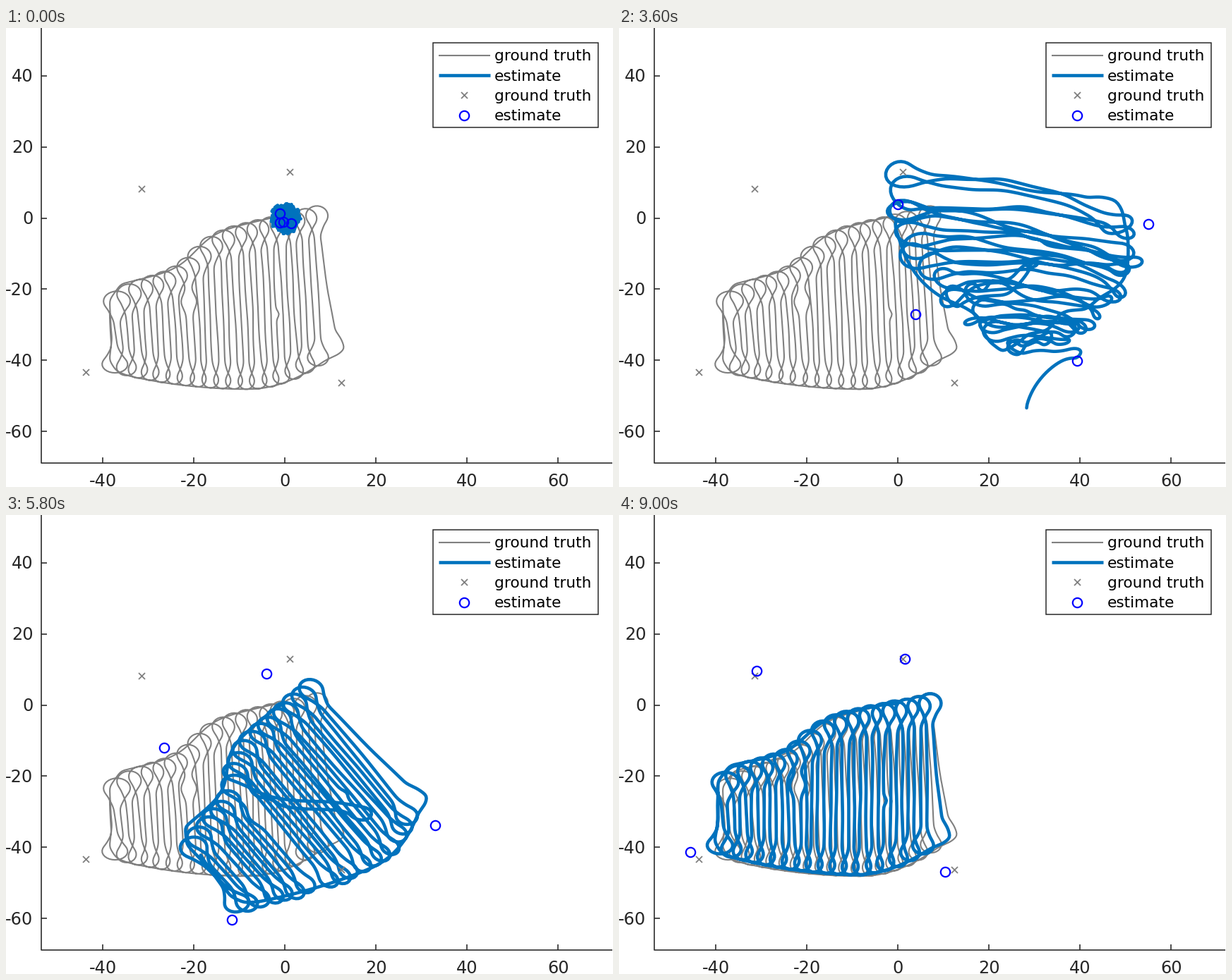
Write a matplotlib script that moves like this. It is 860x651 px and loops after 9400 ms.

```python
import numpy as np
import matplotlib.pyplot as plt
from matplotlib.animation import FuncAnimation
from matplotlib.patches import Rectangle

W, H, DPI = 860, 651, 100
PT = 72 / DPI
X0, Y0, SX, SY = 395.3, 269.5, 6.453, 5.047  # pixel of the zero point, pixels per unit
GRAY, BLUE, MARK, INK = "#808080", "#0072BD", "#0000FF", "#262626"
N, TURNS = 2600, 18
rng = np.random.default_rng(7)


# Points in the plane are complex numbers in axis units.
def smooth(z, sigma):
    r = int(4 * sigma) + 1
    k = np.exp(-0.5 * (np.arange(-r, r + 1) / sigma) ** 2)
    return np.convolve(np.pad(z, r, mode="edge"), k / k.sum(), "valid")


def noise(sigma, sx=1, sy=1):
    n = smooth(rng.standard_normal(N) + 1j * rng.standard_normal(N), sigma)
    n -= n.mean()
    return sx * n.real / n.real.std() + 1j * sy * n.imag / n.imag.std()


def resample(z, n):
    s = np.r_[0, np.cumsum(abs(np.diff(z)))]
    return np.interp(np.linspace(0, s[-1], n), s, z)


# --- mowing path -----------------------------------------------------------
def top(x):
    return 0.3 * x - 2.9 + 4.3 * np.tanh((x + 19.5) / 4.5)


def bottom(x):
    return -48.3 + np.where(x > -8, 0.0287, 0.0054) * (x + 8) ** 2


def bulb(cx, tip, rx, ry, side, neck=0.7):
    """Light-bulb turn from the right-hand line to the left-hand line."""
    cy = tip - side * ry
    a = np.radians(np.linspace(138, -138, 40))
    arc = cx + rx * np.sin(a) + 1j * (cy + side * ry * np.cos(a))
    end = 1j * (cy - side * 1.9 * ry)
    return np.r_[cx + neck + end, arc, cx - neck + end]


def mowing_path():
    out, back = np.linspace(-1, -36, 60), np.linspace(-34.5, 8.8, 70)
    parts = [0, out + 1j * (top(out) - 0.5),
             [-38.5 - 23j, -38.3 - 30j, -38 - 34j, -38.5 - 40j, -37 - 43j],
             back + 1j * (bottom(back) + 0.2),
             [11.7 - 38.3j, 13 - 36.7j, 12.2 - 34j, 10.8 - 31.5j]]
    for k in range(TURNS):
        u = k / (TURNS - 1)
        last, first = np.exp((k + 1 - TURNS) / 1.2), np.exp(-k / 1.2)
        tx, bx = 7.1 - 44 * u, 7.2 - 44.7 * u
        parts.append(bulb(tx, top(tx) - 2.2 * last, 2.6 + 0.4 * last, 2.9, 1))
        parts.append(bulb(bx, bottom(bx), 1.95 + last + 0.5 * first, 2.5, -1))
    parts.append(-38.5 - 26j)
    z = smooth(resample(np.hstack(parts), N), 1.2)
    z = z + 0.1 * noise(7).real
    off = z.real + 21.1
    gap = np.sign(off) * np.maximum(0, 1.7 - abs(off)) * np.exp(-((z.imag + 23.5) / 2.6) ** 2)
    kink = 0.6 * np.exp(-((z.real + 1.8) / 0.8) ** 2 - ((z.imag + 27) / 1.2) ** 2)
    return z + gap + kink


truth = mowing_path()


# --- estimates: turned and bent copies of the path plus drift --------------
def bump(z, lo, hi, width):
    mid = lo + np.argmin(abs(truth[lo:hi] - z))
    return np.exp(-((np.arange(N) - mid) / width) ** 2)


slip = bump(-18 - 48j, 400, N, 32)
corner = bump(-37 - 43j, 0, 300, 50)
rise = np.minimum(1, np.arange(N) / 60)


def estimate(turn, bend=0, rough=0.05, sigma=22, slipped=0, cornered=0):
    z = truth * (turn + bend * truth) + rise * noise(sigma, rough, rough)
    return z + slip * slipped + corner * cornered


posts = np.array([-31.5 + 8.2j, 1 + 13j, -43.8 - 43.3j, 12.3 - 46.3j])

blob = noise(0.6)
blob = (0.1 - 0.1j) + blob * np.minimum(1, 3.3 / abs(blob)) * 1.02
blob = blob.real + 1.28j * blob.imag
blob_posts = np.array([-1.1 - 1.3j, -1.1 + 1.2j, -0.4 - 1.1j, 1.4 - 1.5j])

tangle = noise(7)
tangle = 7.4 + 5.8j + 8 * tangle * abs(tangle) ** 0.2 * 0.95 + noise(2, 0.2, 0.25)
tangle_posts = np.array([-12.9 - 16.7j, -8.9 + 16.5j, 7.5 - 4.4j, 20.3 - 9.9j])

wide = estimate(-0.01 + 1.34j, 0.0048 + 0.0062j, 1.6, 13, -9 + 12j, -4 + 4j)
wide += rise * noise(5, 0.5, 0.6)
wide_posts = np.array([3.8 - 27.1j, 3.8j, 39.3 - 40.2j, 54.9 - 1.6j])

fan = estimate(0.38 + 1.24j, 0.0039 + 0.0039j, 0.75, 20, -13 + 21j, -9 + 8j)
fan_posts = np.array([-8 - 23j, -2.3 + 5.4j, 25.8 - 53.6j, 47.8 - 9.9j])

turned = estimate(0.88 + 0.53j, 0, 0.3, 25, 10 + 20j, 1 + 2j)
turned_posts = np.array([-26.5 - 11.9j, -4.1 + 8.8j, -11.7 - 60.4j, 33 - 33.8j])

NEAR, DONE = np.exp(-1j * np.radians([3.0, 2.5]))
near, done = estimate(NEAR), estimate(DONE)

mean = 0.5 * (tangle + wide)
spread = 14.7 + 8.8j + 1.35 * (mean - 17.8)

# (step, path, landmarks)
KEYS = [(0, blob, blob_posts),
        (5, 0.4 * blob + 0.6 * tangle, 0.4 * blob_posts + 0.6 * tangle_posts),
        (10, tangle, tangle_posts),
        (12, spread, 0.5 * (tangle_posts + wide_posts)),
        (14, wide, wide_posts),
        (19, fan, fan_posts),
        (22, turned, turned_posts),
        (26, near, posts * NEAR),
        (29, near, posts * NEAR),
        (35, done, posts * DONE)]

# Bursts of changes: first moment in ms and number of steps
BURSTS = [(600, 5), (1800, 6), (3200, 3), (4000, 2), (4600, 5), (5800, 5), (7000, 2), (7600, 3), (8400, 4)]
CHANGES = np.hstack([t + 200 * np.arange(c) for t, c in BURSTS])


def pose(step):
    for (s0, p0, m0), (s1, p1, m1) in zip(KEYS, KEYS[1:]):
        if step <= s1:
            u = (step - s0) / (s1 - s0)
            return p0 + u * (p1 - p0), m0 + u * (m1 - m0)


# --- drawing ---------------------------------------------------------------
plt.rcParams["font.family"] = "DejaVu Sans"
fig = plt.figure(figsize=(W / DPI, H / DPI), dpi=DPI, facecolor="white")


def layer(xlim, ylim):
    a = fig.add_axes([0, 0, 1, 1])
    a.set(xlim=xlim, ylim=ylim)
    a.axis("off")
    return a


plot = layer((-X0 / SX, (W - X0) / SX), ((Y0 - H) / SY, Y0 / SY))
frame = layer((0, W), (H, 0))


def line(a, x, y, color, px, cap="butt"):
    return a.plot(x, y, color=color, lw=px * PT, solid_capstyle=cap, solid_joinstyle="round")[0]


def crosses(a, x, y):
    a.plot(x, y, "x", color=GRAY, ms=9 * PT, mew=1.8 * PT)


def circles(a, x, y):
    return a.plot(x, y, "o", mfc="none", mec=MARK, ms=13.4 * PT, mew=2.2 * PT)[0]


def text(x, y, s, px, color, ha):
    frame.text(x, y, s, fontsize=px * PT, color=color, ha=ha, va="baseline")


line(plot, truth.real, truth.imag, GRAY, 2.1)
path = line(plot, [], [], BLUE, 4.6, "round")
crosses(plot, posts.real, posts.imag)
marks = circles(plot, [], [])

line(frame, [49.5, 49.5, 859], [0, 617, 617], INK, 1.6)
for v in range(-60, 61, 20):
    x, y = X0 + SX * v, Y0 - SY * v
    if v > -60:
        line(frame, [x, x], [617, 608.5], INK, 1.6)
        text(x, 649.8, str(v), 24, INK, "center")
    if v < 60:
        line(frame, [49.5, 58], [y, y], INK, 1.6)
        text(38.5, y + 8.8, str(v), 24, INK, "right")

frame.add_patch(Rectangle((605, 20.5), 234, 120, fc="white", ec=INK, lw=1.5 * PT))
rows = 38.5 + 28.35 * np.arange(4)
line(frame, [612.5, 685.5], rows[[0, 0]], GRAY, 2.1)
line(frame, [612.5, 685.5], rows[[1, 1]], BLUE, 4.6)
crosses(frame, [649], rows[2:3])
circles(frame, [649], rows[3:])
for y, s in zip(rows, ("ground truth", "estimate") * 2):
    text(692, y + 7.8, s, 21.7, "black", "left")


def update(i):
    p, m = pose(np.count_nonzero(CHANGES <= i * 200))
    path.set_data(p.real, p.imag)
    marks.set_data(m.real, m.imag)
    return path, marks


anim = FuncAnimation(fig, update, frames=47, interval=200, repeat=True)
plt.show()
```
